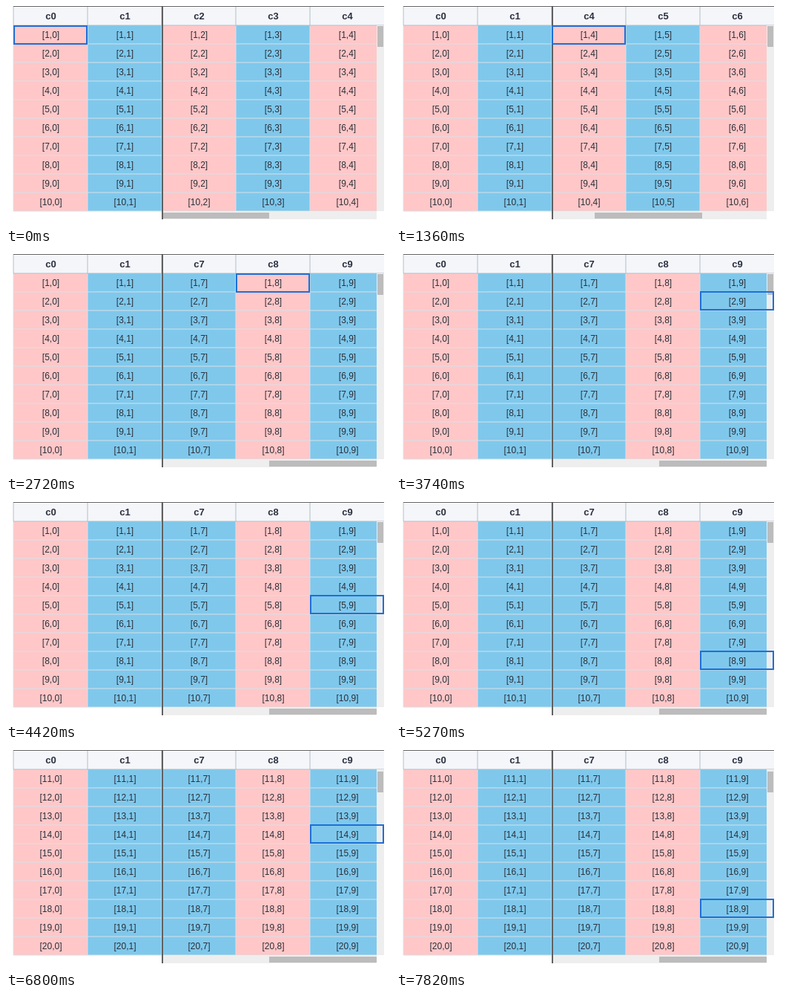
An HTML page with a canvas that plays this animation: 518 px wide and 296 px high, repeating every 8000 ms.

```html
<!DOCTYPE html>
<html lang="en">
<head>
<meta charset="utf-8">
<title>Grid keyboard navigation</title>
<style>
  html, body { margin: 0; width: 100%; height: 100%; overflow: hidden; background: #fff; }
  canvas { display: block; }
</style>
</head>
<body>
<canvas id="grid" width="518" height="296"></canvas>
<script>
const ctx = document.getElementById('grid').getContext('2d');
const LOOP = 8000, TICK = 170;
const LEFT = 10, TOP = 26, COL = 100, ROW = 25, ROWS = 10, BODY = ROWS * ROW;
const FROZEN = 2, LAST_COL = 9, MAX_SCROLL = 5;
const FONT = '"Liberation Sans", Arial, sans-serif';
const PINK = '#ffc7c8', BLUE = '#7fc8ec';
const LINE = '#d9e0e6', HEADER_LINE = '#b0bfca';
const TRACK = '#eeeeee', THUMB = '#bcbcbc';

function box(color, x, y, w, h) {
  ctx.fillStyle = color;
  ctx.fillRect(x, y, w, h);
}

// Hairline centred on a cell edge, so it spreads over both neighbouring pixels.
function line(color, x1, y1, x2, y2) {
  ctx.strokeStyle = color;
  ctx.lineWidth = 1;
  ctx.beginPath();
  ctx.moveTo(x1, y1);
  ctx.lineTo(x2, y2);
  ctx.stroke();
}

function label(text, x, y, font, color) {
  ctx.font = `${font} ${FONT}`;
  ctx.fillStyle = color;
  ctx.fillText(text, x, y);
}

// The selection first walks right along the top row, then down the last column.
function stateAt(time) {
  const tick = Math.floor(time / TICK);
  const col = Math.min(LAST_COL, Math.floor(0.47 * tick + 0.68));
  const row = Math.max(1, Math.floor(0.65 * tick - 11.88));
  const pairStart = col - col % 2;
  const scrollX = Math.min(MAX_SCROLL, Math.max(0, pairStart - FROZEN));
  const scrollY = row > ROWS ? ROWS : 0;
  return { col, row, scrollX, scrollY };
}

function drawColumn(slot, col, firstRow) {
  const x = LEFT + slot * COL, mid = x + COL / 2 + 0.5;
  const right = Math.min(x + COL, 500);
  box('#f5f6f9', x, 0, COL, TOP);
  box(col % 2 ? BLUE : PINK, x, TOP, right - x, BODY);
  label('c' + col, mid, 18, 'bold 13px', '#2b3142');
  for (let i = 0; i < ROWS; i++) {
    const y = TOP + i * ROW;
    label(`[${firstRow + i},${col}]`, mid, y + 17, '12px', '#2b2f38');
    line(LINE, x, y + ROW, right, y + ROW);
  }
  line(HEADER_LINE, x, 0, x, TOP);
  line(LINE, x, TOP, x, TOP + BODY);
}

function drawSelection(slot, index) {
  const y = Math.max(TOP + 1, TOP + index * ROW);
  ctx.strokeStyle = '#1f6fd6';
  ctx.lineWidth = 2;
  ctx.strokeRect(LEFT + slot * COL + 1, y, COL - 2, ROW - 1);
}

function draw(time) {
  const { col, row, scrollX, scrollY } = stateAt(time);
  box('#fff', 0, 0, 518, 296);
  ctx.textAlign = 'center';
  ctx.fontKerning = 'none';
  for (let slot = 0; slot < 5; slot++) {
    drawColumn(slot, slot < FROZEN ? slot : slot + scrollX, scrollY + 1);
  }
  line(HEADER_LINE, LEFT, TOP, 510, TOP);
  box('#666', LEFT, 0, 500, 1);

  box(TRACK, 500, TOP, 10, BODY);
  box(THUMB, 501, TOP + 1 + scrollY * 0.2, 8, 28);
  box(TRACK, 210, 277, 290, 10);
  box(THUMB, 210 + scrollX * 29, 278, 145, 8);
  box('#606060', 210, 0, 2, 287);

  drawSelection(col < FROZEN ? col : col - scrollX, row - scrollY - 1);
}

const start = performance.now();
function frame() {
  draw((performance.now() - start) % LOOP);
  requestAnimationFrame(frame);
}
frame();
</script>
</body>
</html>
```
